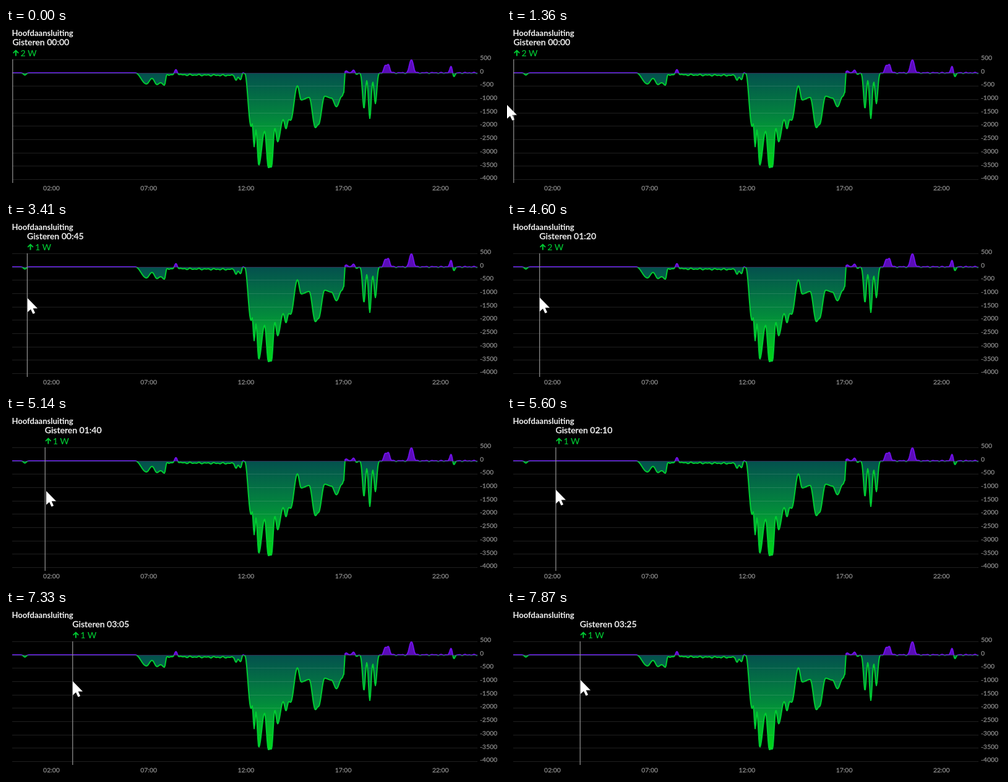
Write an HTML page that moves like this. It is 800 by 270 pixels and loops after 8000 ms.

```html
<!DOCTYPE html>
<html lang="nl">
<head>
<meta charset="utf-8">
<title>Hoofdaansluiting</title>
<style>
html, body { margin: 0; width: 100%; height: 100%; overflow: hidden; background: #000; }
svg { display: block; width: 800px; height: 270px; font-family: Lato, sans-serif; }
.title { font-size: 13px; font-weight: 700; fill: #f6f6f6; }
.time { font-size: 14px; font-weight: 500; fill: #f2f2f2; stroke: #f2f2f2; stroke-width: .3px; }
.value { font-size: 14px; font-weight: 500; }
.axis { font-size: 10.4px; fill: #888; stroke: #888; stroke-width: .3px; }
.grid { stroke: #fff; stroke-opacity: .12; }
.series { stroke-width: 2px; stroke-linejoin: round; }
</style>
</head>
<body>
<svg viewBox="0 0 800 270">
  <defs>
    <linearGradient id="solar" gradientUnits="userSpaceOnUse" x1="0" y1="73" x2="0" y2="229">
      <stop offset="0" stop-color="#04504e"/>
      <stop offset=".5" stop-color="#038a3c"/>
      <stop offset="1" stop-color="#00dc14"/>
    </linearGradient>
    <clipPath id="above"><rect x="10" width="752" height="73.6"/></clipPath>
    <clipPath id="below"><rect x="10" y="73.6" width="752" height="180"/></clipPath>
  </defs>
  <g clip-path="url(#below)"><path class="area" fill="url(#solar)"/></g>
  <g clip-path="url(#above)"><path class="area" fill="#5a0cb8"/></g>
  <g id="axes"></g>
  <g class="series" fill="none">
    <path class="curve" clip-path="url(#below)" stroke="#00cc32"/>
    <path class="curve" clip-path="url(#above)" stroke="#7010e8"/>
  </g>
  <text class="title" x="9.5" y="12.5">Hoofdaansluiting</text>
  <rect id="hair" y="51" width="1.2" height="201" fill="#949494"/>
  <g id="label">
    <text class="time" y="28.2"></text>
    <path id="arrow" d="M5.5 10V1.2M1.2 5.4L5.5 1.1L9.8 5.4" fill="none" stroke-width="2"/>
    <text class="value" x="13" y="45.5"></text>
  </g>
  <path id="mouse" d="M0 0V22.5L5 18L8.5 25.5L12 24L8.7 16.5H16Z" fill="#fff"/>
</svg>
<script>
const LOOP = 8000, LEFT = 10.6, STEP = 2.62, ZERO = 73;
const $ = s => document.querySelector(s);
const setAll = (s, name, value) => document.querySelectorAll(s).forEach(e => e.setAttribute(name, value));
const clamp = v => Math.min(1, Math.max(0, v));
const two = n => String(n).padStart(2, '0');

// Axes
let axes = '';
for (let w = 500; w >= -4000; w -= 500) {
  const y = ZERO - w * 21.7 / 500;
  axes += `<path class="grid" d="M10 ${Math.floor(y) + .5}H762"/><text class="axis" x="766" y="${y + .6}">${w}</text>`;
}
for (let h = 2; h < 24; h += 5) {
  axes += `<text class="axis" text-anchor="middle" x="${LEFT + h * 12 * STEP}" y="264">${two(h)}:00</text>`;
}
$('#axes').innerHTML = axes;

// Turning points of the solar output, joined by half cosine waves
const sun = [[209, 73], [227, 91], [236, 82], [244, 92], [250, 89], [256, 93], [260, 76], [367, 77],
  [372, 85], [375, 80], [379, 84], [383, 73], [386, 74], [396, 160], [398, 156], [401, 193], [404, 166],
  [408.5, 223], [418, 168], [424, 227], [429, 226], [434.5, 163], [439, 185], [448, 149], [452.5, 164],
  [457, 149], [460, 150], [471, 94], [477, 117], [490, 113], [500, 162], [505, 157], [515, 111],
  [526, 114], [534, 128], [543, 111], [546, 105], [548, 73]];
// Short peaks of one common width
const spikes = [[30.5, 76.5], [275, 65], [550, 70], [562, 68], [566, 76], [578.5, 131], [588, 147], [597, 123],
  [613, 62], [618, 60], [653.5, 58], [657, 59], [720, 60], [723, 82]];

function sunAt(x) {
  const i = sun.findIndex(p => p[0] > x);
  if (i < 1) return ZERO;
  const [[x0, y0], [x1, y1]] = [sun[i - 1], sun[i]];
  return y0 + (y1 - y0) * (1 - Math.cos(Math.PI * (x - x0) / (x1 - x0))) / 2;
}

function powerAt(x) {
  const busy = x > 262 && x < 367 ? 1.3 : x > 600 ? .8 : 0;
  const hum = busy * Math.sin(x * .65) * Math.cos(x * .17);
  return spikes.reduce((y, [at, top]) => y + (top - ZERO) * Math.exp(-(((x - at) / 2.2) ** 2) / 2), sunAt(x) + hum);
}

let curve = '';
for (let x = 10; x <= 762; x++) curve += `${curve ? 'L' : 'M'}${x} ${powerAt(x).toFixed(2)}`;
setAll('.curve', 'd', curve);
setAll('.area', 'd', `${curve}V73.5H10Z`);

// Pointer glides: start, end, x reached; the screen refreshes every TICK ms
const TICK = 66.4;
const glides = [[500, 630, -9], [830, 1090, -2], [1360, 1490, 4], [1760, 2550, 19.4], [2620, 2750, 29],
  [3210, 3680, 40.2], [3940, 4270, 48], [4470, 4680, 54.9], [4870, 5600, 79], [6000, 6400, 87.5],
  [6670, 6940, 98], [7130, 7400, 110.5], [7670, 7870, 119]];

function pointerAt(time) {
  const t = 500 + TICK * Math.floor((time - 480) / TICK);
  return glides.reduce((x, [start, end, to]) => x + (to - x) * clamp((t - start + 56) / (end - start + TICK)), -18);
}

const watts = { 0: 2, 1: 2, 2: 0, 7: 34, 8: 62, 16: 2 };

function draw(time) {
  const x = pointerAt(time % LOOP);
  const y = 125 - 11 * (Math.max(0, x) / 119) ** 2;
  const i = Math.max(0, Math.floor((x - 10.3) / STEP));
  const at = LEFT + i * STEP, w = watts[i] ?? 1;
  const color = w ? '#00c832' : '#7008e8';
  $('#mouse').setAttribute('transform', `translate(${Math.round(x + .3)} ${Math.round(y)})`);
  $('#hair').setAttribute('x', at - .4);
  $('#label').setAttribute('transform', `translate(${at - .2} 0)`);
  $('.time').textContent = `Gisteren ${two(Math.floor(i / 12))}:${two(i % 12 * 5)}`;
  $('.value').textContent = `${w} W`;
  $('.value').setAttribute('fill', color);
  $('#arrow').setAttribute('stroke', color);
  $('#arrow').setAttribute('transform', w ? 'translate(0 35.5)' : 'translate(0 46) scale(1 -1)');
}

const begin = performance.now();
function tick() {
  draw(performance.now() - begin);
  requestAnimationFrame(tick);
}
tick();
</script>
</body>
</html>
```
